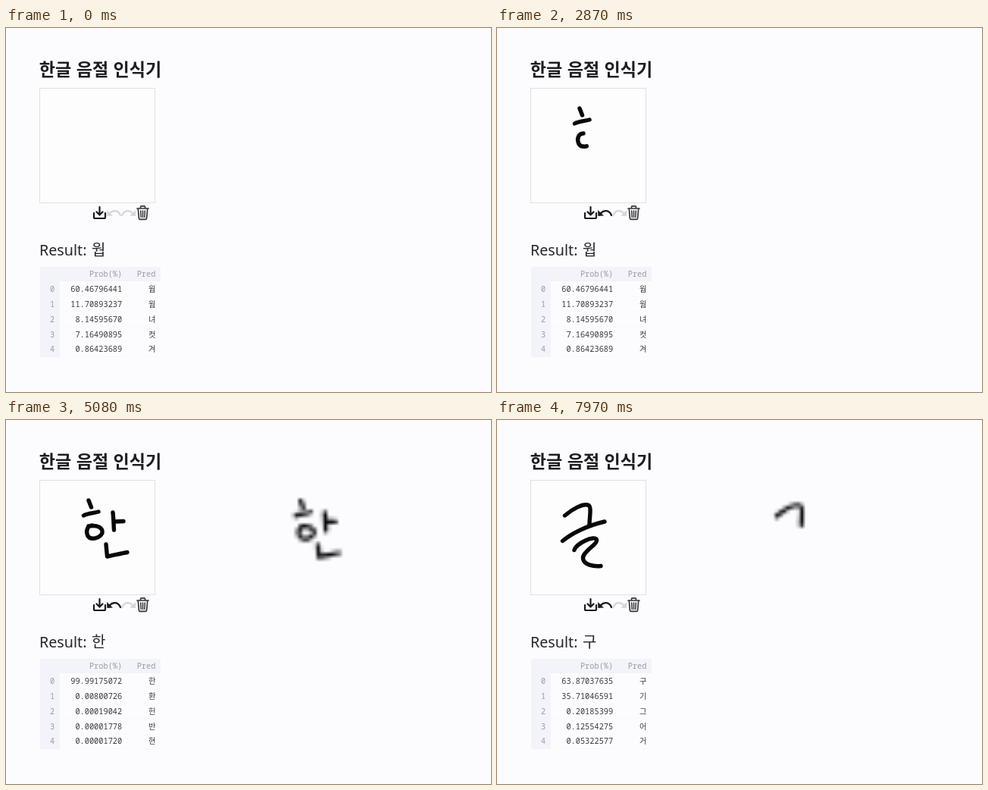
Recreate the animation shown at these times as an HTML page with a canvas. Size 640x480 px, loop 7.99 s.

```html
<!DOCTYPE html>
<html lang="ko">
<head>
<meta charset="utf-8">
<title>한글 음절 인식기</title>
<style>
  html, body { margin: 0; width: 100%; height: 100%; overflow: hidden; background: #fcfcfe; }
  svg { display: block; width: 640px; height: 480px; }
  canvas { position: absolute; left: 324px; top: 80px; width: 152px; height: 152px; }
  text { white-space: pre; fill: #27262c; }
  .title { font: 700 23.1px "Noto Sans CJK KR", "Noto Sans CJK", sans-serif; fill: #1e1c22; }
  .result { font: 400 19.7px "Noto Sans", "Noto Sans CJK KR", sans-serif; }
  .syllable { font: 400 20px "Noto Sans CJK KR", "Noto Sans CJK", sans-serif; }
  .cell { font: 500 10.3px "Noto Sans Mono", "DejaVu Sans Mono", monospace; fill: #393940; text-anchor: end; }
  .pred { font: 500 10.3px "Noto Sans CJK KR", "Noto Sans CJK", sans-serif; }
  .head { fill: #9b9ba2; }
  .ink { fill: none; stroke: #09080a; stroke-width: 5.4; stroke-linecap: round; stroke-linejoin: round; }
  .icon { fill: none; stroke: currentColor; stroke-linecap: round; stroke-linejoin: round; }
</style>
</head>
<body>
<svg viewBox="0 0 640 480">
  <defs>
    <g id="bend">
      <path d="M136 245 C141 239.5 148 239.5 151 247" class="icon" stroke-width="2.2"/>
      <path d="M133 240 L133.4 248 L141 247.4 Z" fill="currentColor"/>
    </g>
  </defs>
  <rect width="640" height="480" fill="#fcfcfe"/>
  <text class="title" x="43.7" y="63">한글 음절 인식기</text>
  <rect x="44.5" y="79.5" width="152" height="151" fill="#fdfdfe" stroke="#dfdfe4"/>
  <g id="pad" class="ink"></g>

  <g class="icon" color="#1a191c" stroke-width="2.2">
    <path d="M116 244 V249.5 Q116 251 117.5 251 H129.5 Q131 251 131 249.5 V244"/>
    <path d="M123.5 236 V246 M119.5 242.5 L123.5 246.5 L127.5 242.5"/>
  </g>
  <use id="undo" href="#bend"/>
  <use href="#bend" transform="translate(304.3 0) scale(-1 1)" color="#d5d5da"/>
  <g id="trash" class="icon" stroke-width="1.7">
    <path d="M173 238 H188 M177.5 237.5 V236 Q177.5 234.8 178.7 234.8 H182.3 Q183.5 234.8 183.5 236 V237.5"/>
    <path d="M174.3 238.5 L175.4 250.8 Q175.6 252.3 177 252.3 H184 Q185.4 252.3 185.6 250.8 L186.7 238.5"/>
    <path d="M177.7 241 L178.2 249.5 M180.5 241 V249.5 M183.3 241 L182.8 249.5" stroke-width="1.5"/>
  </g>

  <text class="result" x="44" y="300">Result:</text>
  <text class="syllable" id="best" x="113" y="300"></text>
  <path d="M45 315 H204 V334 H71 V434 H45 Z" fill="#f3f3fa"/>
  <g id="table"></g>
</svg>
<canvas id="preview" width="32" height="32"></canvas>
<script>
const LOOP = 7990;
const $ = id => document.getElementById(id);

function add(parent, tag, attrs, text = "") {
  const el = document.createElementNS("http://www.w3.org/2000/svg", tag);
  for (const key in attrs) el.setAttribute(key, attrs[key]);
  el.textContent = text;
  return parent.appendChild(el);
}

// pen down, pen up, wiped, preview on, preview off, path
const strokes = [
  [2400, 2480, 5850, 3850, 6700, "M109 106 L112.5 115"],
  [2570, 2680, 5850, 3850, 6700, "M102.5 126 C108 123 115 123 122 121"],
  [2770, 2990, 5850, 4400, 6700, "M114 139 C107 139 105 147 108 153 C112 159 124 156 127 149 C128 142 121 138 109 140"],
  [3080, 3170, 5850, 4900, 6700, "M141 122 C142 130 142 138 142.5 145"],
  [3230, 3290, 5850, 4900, 6700, "M143 134 L155 133.5"],
  [3350, 3490, 5850, 4900, 6700, "M132 164 L133.5 180 C142 178.5 151 176 160 174.5"],
  [6450, 6720, LOOP, 7400, LOOP, "M89.5 126 C99 118 114 109 121 112.5 C125 115 122 128 122 138"],
  [6880, 7060, LOOP, LOOP, LOOP, "M86.5 159.5 C99 149 120 139 142 134"],
  [7190, 7600, LOOP, LOOP, LOOP, "M102 171.5 C104 163 129 151 131.5 158 C133 164 112 174 113.5 183 C115 191 127 193.5 137 192.5"]
].map(([down, up, wiped, on, off, d]) => ({
  down, up, wiped, on, off,
  line: add($("pad"), "path", { d, pathLength: 1 }),
  copy: new Path2D(d)
}));

const blank = ["웝웜녀컷겨", "60.46796441 11.70893237 8.14595670 7.16490895 0.86423689"];
const results = [
  [0, ...blank],
  [3850, "느으누우그", "18.91413033 12.37177104 6.78126663 6.57097325 4.74585779"],
  [4900, "한환헌반현", "99.99175072 0.00800726 0.00019042 0.00001778 0.00001720"],
  [6700, ...blank],
  [7400, "구기그어거", "63.87037635 35.71046591 0.20185399 0.12554275 0.05322577"]
];

const cell = (x, y, text, cls = "") => add($("table"), "text", { x, y, class: "cell " + cls }, text);
cell(153.2, 328.3, "Prob(%)", "head");
cell(197.4, 328.3, "Pred", "head");
const rows = [0, 1, 2, 3, 4].map(i => {
  const y = 348.2 + 19.8 * i;
  add($("table"), "path", { d: `M71 ${y + 6} H204`, stroke: "#f9f9fc" });
  cell(64.2, y, i, "head");
  return { prob: cell(153.2, y), pred: cell(197.4, y, "", "pred") };
});

let shown;
function showResult(result) {
  if (result === shown) return;
  shown = result;
  const [, names, probs] = result;
  $("best").textContent = names[0];
  probs.split(" ").forEach((prob, i) => {
    rows[i].prob.textContent = prob;
    rows[i].pred.textContent = names[i];
  });
}

// The preview is the pad shrunk to 32 x 32 pixels and enlarged again.
const ctx = $("preview").getContext("2d");
const shrink = 32 / 152;
ctx.lineWidth = 5.8;
ctx.lineCap = ctx.lineJoin = "round";
ctx.strokeStyle = "#09080a";

function showPreview(copies) {
  ctx.setTransform(1, 0, 0, 1, 0, 0);
  ctx.clearRect(0, 0, 32, 32);
  ctx.setTransform(shrink, 0, 0, shrink, -44.5 * shrink, -79.5 * shrink);
  copies.forEach(path => ctx.stroke(path));
}

const within = (t, from, to) => t >= from && t < to;

function draw(t) {
  for (const s of strokes) {
    const p = Math.min(1, Math.max(0, (t - s.down) / (s.up - s.down)));
    s.line.setAttribute("visibility", within(t, s.down, s.wiped) ? "visible" : "hidden");
    s.line.setAttribute("stroke-dasharray", p < 1 ? `${p} 2` : "none");
  }
  showPreview(strokes.filter(s => within(t, s.on, s.off)).map(s => s.copy));
  const inked = strokes.some(s => within(t, s.up, s.wiped));
  $("undo").setAttribute("color", inked ? "#1a191c" : "#d5d5da");
  $("trash").setAttribute("color", within(t, 5700, 6290) ? "#d64d58" : "#35343a");
  showResult(results.filter(r => r[0] <= t).pop());
}

const start = performance.now();
function tick() {
  draw((performance.now() - start) % LOOP);
  requestAnimationFrame(tick);
}
tick();
</script>
</body>
</html>
```
